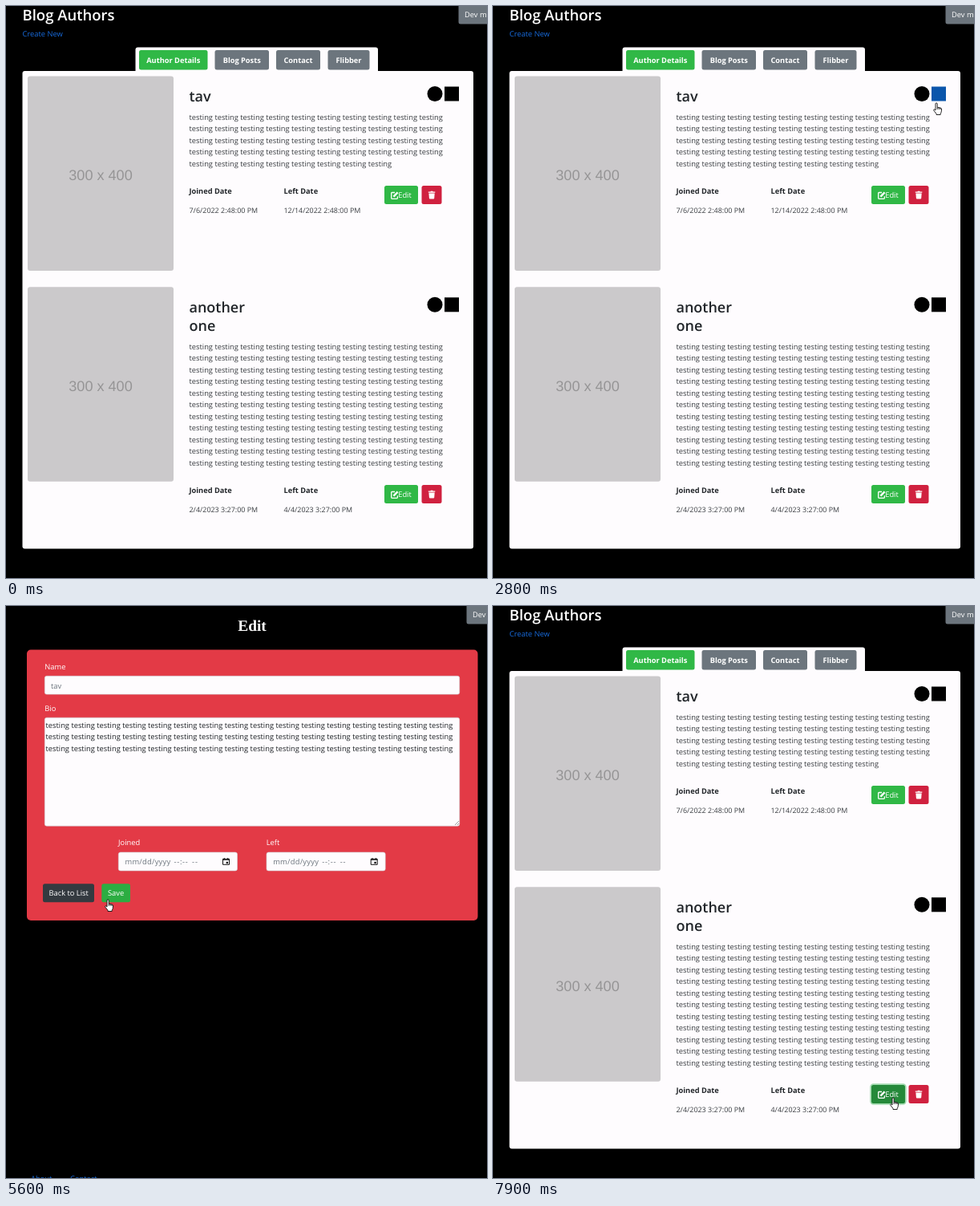
Write an HTML page that moves like this. It is 600 px wide and 713 px high and loops after 8000 ms.

```html
<!DOCTYPE html>
<html lang="en">
<head>
<meta charset="utf-8">
<title>Blog Authors</title>
<style>
html, body { margin: 0; width: 100%; height: 100%; overflow: hidden; background: #000; }
svg { display: block; width: 600px; height: 713px; }
text { font: 9.33px "Open Sans", "Noto Sans", sans-serif; text-rendering: geometricPrecision; white-space: pre; }
.b { font-weight: 700; font-size: 9.25px; }
.h { font-weight: 600; font-size: 18px; }
.date { font-size: 8.95px; }
.size { font: 18.1px "Liberation Sans", Arial, sans-serif; }
.title { font: bold 19.4px "Liberation Serif", Times, serif; }
.mid { text-anchor: middle; }
</style>
</head>
<body>
<svg id="stage" viewBox="0 0 600 713">
  <g id="list"></g>
  <g id="form"></g>
  <g id="cursor" stroke="#111" stroke-width=".9" stroke-linejoin="round" fill="#fff">
    <path id="hand" d="M3 9V2a1.1 1.1 0 0 1 2.2 0V6.2l4 .8q1.5.4 1.4 2l-.5 3.5-.9 1.8v1.2H4v-1.2L.9 10.3q-.6-1.4.6-1.5L3 10zM5.2 6.2v2.6M7.1 6.6v2.2M9 7v2"/>
    <path id="arrow" d="M4 1v12l2.8-2.6 1.8 4 1.8-.8-1.8-3.9h3.7z"/>
    <path id="beam" d="M2 1h4M4 1v13M2 14h4" fill="none"/>
  </g>
</svg>
<script>
const $ = id => document.getElementById(id);
const INK = '#212529', BODY = '#3a3e42', CARD = '#fefcfe', GRAY = '#6c757d', GREEN = '#30b846', LINK = '#176bdd';
const AUTHOR = 'tav';

const rect = (x, y, w, h, fill, r = 2.5, more = '') =>
  `<rect x="${x}" y="${y}" width="${w}" height="${h}" rx="${r}" fill="${fill}" ${more}/>`;
const text = (x, y, s, fill = INK, cls = '', more = '') =>
  `<text x="${x}" y="${y}" fill="${fill}" class="${cls}" ${more}>${s}</text>`;
const words = n => Array(n).fill('testing').join(' ');
const lines = (x, y, counts, fill) => counts.map((n, i) => text(x, y + i * 14.53, words(n), fill)).join('');

// Controls that react to the pointer
const hot = [];
function control(page, x, y, w, h, base, over, ring, r = 2.5) {
  const id = 'c' + hot.length;
  hot.push({ id, page, x, y, w, h, base, over, ring });
  return rect(x, y, w, h, base, r, `id="${id}" stroke-width="3.4" paint-order="stroke"`);
}

function author(dy, low, name, counts, joined, left) {
  const y = 224 + low;
  return rect(27, 87.5 + dy, 182, 242.5, '#cbc9cb', 3)
    + text(118, 217 + dy, '300 x 400', '#969596', 'size mid')
    + name.map((s, i) => text(228.5, 119 + dy + i * 23.2, s, INK, 'h')).join('')
    + lines(228.5, 141.7 + dy + (name.length - 1) * 23, counts, BODY)
    + control('list', 525.5, 100 + dy, 19, 19, '#000', '#0b56ab', '', 9.5)
    + control('list', 547, 100.5 + dy, 18, 18, '#000', '#0b56ab', '', 0)
    + text(228.5, y + 10.2, 'Joined Date', INK, 'b') + text(346.5, y + 10.2, 'Left Date', INK, 'b')
    + text(228.5, y + 34.2, joined, BODY, 'date') + text(346.5, y + 34.2, left, BODY, 'date')
    + control('list', 472, y, 42, 23, GREEN, '#25893a', '#a3dcb0')
    + `<g transform="translate(480 ${y + 7})" fill="none" stroke="#fff">
        <path d="M5 1.5H1.5q-.8 0-.8.8V8.6q0 .8.8.8H7.6q.8 0 .8-.8V6.3" stroke-width="1.3"/>
        <path d="M3.4 6.6L8.6 1.3" stroke-width="2.4"/></g>`
    + text(489.2, y + 15, 'Edit', '#fff')
    + rect(518.5, y, 25, 23, '#d0213f')
    + `<g transform="translate(526.8 ${y + 6.8})" fill="#fff">
        <path d="M0 .8H2.6L3.1 0H5.4L5.9.8H8.5V2H0zM.6 2.7H7.9L7.4 9q-.1.8-.9.8H2q-.8 0-.9-.8z"/></g>`;
}

const tab = (x, w, s, fill = GRAY) =>
  rect(x, 55, w, 24.5, fill) + text(x + w / 2, 70.6, s, '#fff', 'b mid');

$('list').innerHTML =
  text(20.5, 18.2, 'Blog Authors', '#fff', 'h', 'style="font-size:18.5px"')
  + text(20.5, 38, 'Create New', LINK)
  + rect(564.5, -5, 60, 27.5, GRAY) + text(572, 14.3, 'Dev mode', '#fff')
  + rect(161.5, 51.5, 302.5, 34, CARD, 3) + rect(20.5, 81, 562.5, 595.5, CARD, 3)
  + tab(166, 85.5, 'Author Details', GREEN) + tab(260.5, 67.5, 'Blog Posts')
  + tab(337, 55, 'Contact') + tab(401.5, 52, 'Flibber')
  + author(0, 0, [AUTHOR], [10, 10, 10, 10, 8], '7/6/2022 2:48:00 PM', '12/14/2022 2:48:00 PM')
  + author(262.8, 373, ['another', 'one'], Array(11).fill(10), '2/4/2023 3:27:00 PM', '4/4/2023 3:27:00 PM');

const field = (x, y, w, h) => rect(x, y, w, h, CARD, 2.5, 'stroke="#ced4da" stroke-width=".6"');
const dateField = (x, label) =>
  text(x, 298.3, label, '#fff') + field(x + .3, 307, 148.2, 23)
  + text(x + 8.5, 322, 'mm/dd/yyyy', GRAY, '', 'letter-spacing=".25"')
  + text(x + 69.5, 322, '--:--', GRAY, '', 'letter-spacing=".7"')
  + text(x + 92, 322, '--', GRAY, '', 'letter-spacing=".9"')
  + `<path d="M${x + 130.5} 315.3h8v7h-8zM${x + 130.5} 316.3h8M${x + 132.3} 314v2M${x + 136.7} 314v2" fill="none" stroke="#111"/>`
  + rect(x + 134.7, 318.8, 2.3, 2.3, '#111', 0);

$('form').innerHTML =
  text(307, 31, 'Edit', '#fff', 'title mid')
  + rect(574.5, -5, 60, 27.5, GRAY) + text(582, 14.3, 'Dev mode', '#fff')
  + rect(26, 54.5, 562.5, 337.5, '#e33a46', 5)
  + text(48.3, 78.8, 'Name', '#fff') + field(48.3, 87.3, 517.4, 22.8) + text(56, 102.5, AUTHOR, GRAY)
  + text(48.3, 130.8, 'Bio', '#fff') + field(48.3, 139.2, 517.4, 135)
  + lines(49.5, 151.5, [16, 16, 16])
  + '<path d="M560 273l5-5M563 273l2-2" stroke="#777" stroke-width=".7"/>'
  + dateField(140, 'Joined') + dateField(324.7, 'Left')
  + control('form', 46, 346.3, 64, 23, '#343a40', '#23272b', '#85898c') + text(53.5, 361.3, 'Back to List', '#fff')
  + control('form', 119.3, 346.3, 35.7, 23, GREEN, '#2cad42', '') + text(127, 361.3, 'Save', '#fff')
  + text(31, 717, 'About', LINK) + text(80, 717, 'Contact', LINK);

// Pointer path: time, left, top
const path = [
  [900, 601, 150], [1500, 534, 111], [1700, 534, 110], [2100, 535, 110], [2400, 549, 112],
  [2800, 549, 120], [3600, 490, 238], [4100, 491, 240], [4500, 491, 240], [5400, 134, 353],
  [5600, 123, 365], [5900, 82, 360], [6300, 81, 361], [6500, 84, 364], [7500, 494, 610],
  [7700, 495, 612], [8000, 495, 612]
];
const LOAD_FORM = 4400, LOAD_LIST = 6300;
const clicks = [[4000, LOAD_FORM], [6100, LOAD_LIST], [7800, 8000]];

function pointer(t) {
  const i = path.findIndex(k => k[0] > t);
  if (i < 1) return [-50, -50];
  const [a, b] = [path[i - 1], path[i]];
  let u = (t - a[0]) / (b[0] - a[0]);
  u = u * u * (3 - 2 * u);
  return [1, 2].map(n => a[n] + (b[n] - a[n]) * u);
}

const inside = (px, py, { x, y, w, h }) => px >= x && px <= x + w && py >= y && py <= y + h + 3;

function draw(t) {
  const page = t >= LOAD_FORM && t < LOAD_LIST ? 'form' : 'list';
  for (const p of ['list', 'form']) $(p).style.display = p === page ? '' : 'none';

  const [x, y] = pointer(t), hx = x + 4, hy = y + 1;
  const stale = t >= LOAD_FORM && t < LOAD_FORM + 100 || t >= LOAD_LIST && t < LOAD_LIST + 100;
  const pressed = clicks.some(([a, b]) => t >= a && t < b);
  let over = false;
  for (const c of hot) {
    const on = c.page === page && !stale && inside(hx, hy, c);
    over ||= on;
    $(c.id).setAttribute('fill', on ? c.over : c.base);
    $(c.id).setAttribute('stroke', on && pressed && c.ring || 'none');
  }
  const typing = page === 'form' && inside(hx, hy, { x: 48, y: 139, w: 518, h: 132 });
  const shape = over || stale ? 'hand' : typing ? 'beam' : 'arrow';
  for (const s of ['hand', 'arrow', 'beam']) $(s).style.display = s === shape ? '' : 'none';
  $('cursor').setAttribute('transform', `translate(${x} ${y})`);
}

const start = performance.now();
function tick() {
  const t = (performance.now() - start) % 8000;
  draw(Math.floor(t / 100) * 100);
  requestAnimationFrame(tick);
}
tick();
</script>
</body>
</html>
```
